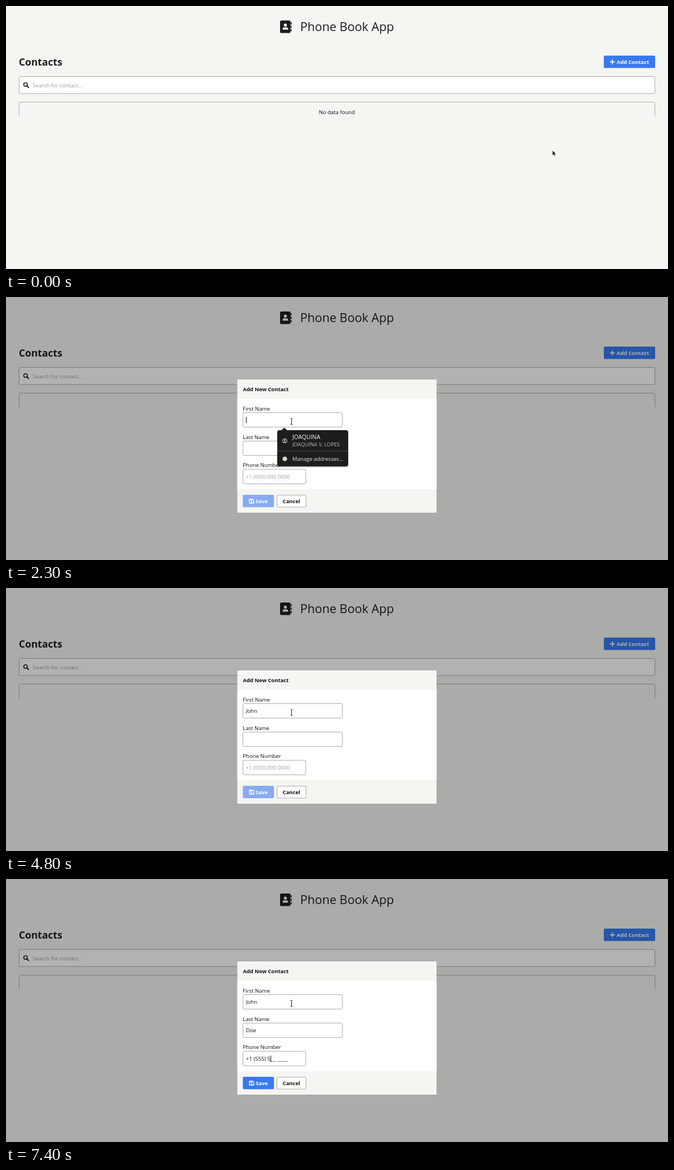
Write an HTML page that moves like this. It is 1186 px wide and 472 px high and loops after 8000 ms.

```html
<!DOCTYPE html>
<html lang="en">
<head>
<meta charset="utf-8">
<title>Phone Book App</title>
<style>
  html, body { margin: 0; width: 100%; height: 100%; overflow: hidden; background: #f5f5f2; }
  svg { display: block; width: 1186px; height: 472px; }
  text { font: 9.6px "Open Sans", "Noto Sans", sans-serif; fill: #10100f; white-space: pre; }
  .bold { font-weight: 700; font-size: 9.5px; }
  .white { fill: #fffffd; }
  .hint { fill: #9b9ca3; }
  .mid { text-anchor: middle; }
  .gap { letter-spacing: .5px; }
  .box { fill: #fffffd; stroke: #a9aab2; }
  .pop text { fill: #e4e4df; }
  .pop .main { font-size: 10.4px; fill: #f6f6f2; }
  .pop .sub { font-size: 9.3px; fill: #bdbdb8; }
</style>
</head>
<body>
<svg id="stage" viewBox="0 0 1186 472"></svg>
<script>
const LOOP = 8000;
const MASK = '+1 (___) ___ ____';
const TYPED = ['+1 (', '+1 (5', '+1 (55', '+1 (555) ', '+1 (555) 5'];
const FIELD_TOP = { first: 207, last: 258, phone: 309 };
const BLUE = '#3879ef';

const text = (x, y, str, cls = '', id = '') =>
  `<text x="${x}" y="${y}" class="${cls}" id="${id}">${str}</text>`;
const rect = (x, y, w, h, fill, r = 0, id = '') =>
  `<rect x="${x}" y="${y}" width="${w}" height="${h}" rx="${r}" fill="${fill}" id="${id}"/>`;
const box = (x, y, w, h) =>
  `<rect x="${x}" y="${y}" width="${w}" height="${h}" rx="2" class="box"/>`;

// Dark suggestion bubble hanging below a field
const bubble = (id, top, w, h, body) => `<g class="pop" id="${id}">
  ${rect(485.5, top + 1, w + 1, h + 1, 'rgba(0,0,0,.2)', 4)}
  ${rect(486, top, w, h, '#1d1d1b', 4)}
  <path d="M493 ${top + .5}l5.5-5 5.5 5z" fill="#1d1d1b"/>${body}</g>`;

const addressBubble = (id, w, fullName) => bubble(id, 239, w, 65, `
  <g fill="none" stroke="#d8d8d3"><circle cx="499.5" cy="258" r="3.9"/>
    <path d="M497 260.8q2.5-2.2 5 0"/></g>
  <circle cx="499.5" cy="257" r="1.4" fill="#d8d8d3"/>
  <path d="M486 276.5h${w}" stroke="#4b4b48"/>
  <circle cx="499.5" cy="290.5" r="4" fill="#d8d8d3"/>
  ${text(513, 255.3, 'JOAQUINA', 'main')}${text(513, 267.7, fullName, 'sub')}
  ${text(513, 294, 'Manage addresses…')}`);

const listBubble = (id, top, w, names) => bubble(id, top, w, names.length * 24 + 3,
  names.map((n, i) => text(494, top + 17 + i * 24, n)).join(''));

const page = `
  ${rect(0, 0, 1186, 472, '#f5f5f2')}
  ${rect(491, 26, 18.7, 22.5, '#1c1c1b', 2.6)}
  <path d="M510.2 29h1.6v4h-1.6zM510.2 35.2h1.6v4h-1.6zM510.2 41.4h1.6v4h-1.6z" fill="#1c1c1b"/>
  <circle cx="500.5" cy="34.3" r="2.8" fill="#f5f5f2"/>
  <path d="M495.5 42.6v-1.1q0-3.3 3.3-3.3h3.4q3.3 0 3.3 3.3v1.1z" fill="#f5f5f2"/>
  <g style="fill:#1c1c1b">
    <text x="527" y="45.3" style="font-size:21.7px;fill:#1c1c1b">Phone Book App</text>
    <text x="23" y="107" class="bold" style="font-size:17.7px;fill:#1c1c1b">Contacts</text>
  </g>
  ${rect(1071, 89, 92, 22.3, BLUE, 2, 'add')}
  <path d="M1082 100.3h8.8M1086.4 95.9v8.8" stroke="#fffffd" stroke-width="1.7"/>
  ${text(1094, 104, 'Add Contact', 'bold white')}
  ${box(23.5, 126.5, 1139, 30.5)}
  <circle cx="35" cy="141" r="3.2" fill="none" stroke="#1c1c1b" stroke-width="1.6"/>
  <path d="M37.3 143.3l3 3" stroke="#1c1c1b" stroke-width="2" stroke-linecap="round"/>
  ${text(48, 145.6, 'Search for contact...', 'hint')}
  <path d="M23.5 197.5v-23q0-2 2-2h1135q2 0 2 2v23" fill="none" stroke="#a9aab2"/>
  ${text(592.8, 193.6, 'No data found', 'mid')}`;

const modal = `<g id="modal">
  ${rect(0, 0, 1186, 472, 'rgba(0,0,0,.3)')}
  ${rect(414.5, 148, 356.8, 239, '#f5f5f2')}
  ${rect(414.5, 182.5, 356.8, 162.5, '#fffffd')}
  ${text(424.5, 169, 'Add New Contact', 'bold')}
  ${text(424.3, 203.8, 'First Name')}${box(424.5, 207.5, 178, 26)}
  ${text(424.3, 254.6, 'Last Name')}${box(424.5, 258.5, 178, 26)}
  ${text(424.3, 305.3, 'Phone Number')}${box(424.5, 309.2, 112.5, 26)}
  ${text(430, 224.2, '', '', 'first')}${text(430, 275, '', '', 'last')}
  ${text(429.7, 325.8, '+1 (000) 000 0000', 'hint', 'hint')}
  ${text(430, 325.8, '<tspan id="typed"></tspan><tspan id="rest" class="gap"></tspan>', '', 'phone')}
  ${rect(424.3, 355, 55.7, 22.3, BLUE, 2, 'save')}
  <path d="M436.2 362.6h5.8l2 2v5.4h-7.8z" fill="none" stroke="#fffffd" stroke-width="1.3" stroke-linejoin="round"/>
  <path d="M437 362.4h4.6v2.6h-4.6z" fill="#fffffd"/>
  <circle cx="440.1" cy="367.4" r="1.3" fill="#fffffd"/>
  ${text(447.2, 370, 'Save', 'bold white')}
  ${box(485.5, 355.5, 52, 21.5)}${text(511.3, 370, 'Cancel', 'bold mid')}
  ${rect(430, 215, 1, 11.5, '#10100f', 0, 'caret')}
  ${addressBubble('short', 127, 'JOAQUINA V. LOPES')}
  ${addressBubble('full', 151, 'JOAQUINA VIDEIRA LOPES')}
  ${listBubble('john', 239, 95, ['John'])}
  ${listBubble('two', 290, 97, ['Doe', 'Dane'])}
  ${listBubble('one', 290, 97, ['Doe'])}
</g>`;

const pointers = `
  <path id="arrow" d="M0 0v9.6l2.2-2 1.6 3.6 1.6-.7-1.6-3.5h3z" fill="#151514" stroke="#f5f5f2" stroke-width=".8"/>
  <path id="hand" d="M-.9 6.2V.6Q0-.7.9.6v3.2l3.5.8q1.3.4 1.2 1.8l-.6 2.8-.7 1.6H-.2l-2.7-3.9q-.2-1.5 1-1.1z" fill="#fffffd" stroke="#222" stroke-width=".9"/>
  <path id="beam" d="M-2-5.5h1.4l.6.6.6-.6H2M0-5V5M-2 5.5h1.4l.6-.6.6.6H2" fill="none" stroke="#1c1c1b" stroke-width="1"/>`;

document.getElementById('stage').innerHTML = page + modal + pointers;
const el = id => document.getElementById(id);
const show = (id, on) => el(id).style.display = on ? '' : 'none';

// Each step changes only the values it lists
const START = { shape: 'arrow', x: 979, y: 259, hover: false, modal: false, focus: 'first',
  caret: true, first: '', last: '', digits: -1, pop: '', save: false };
const STEPS = [
  [100, { x: 1003, y: 248 }],
  [300, { x: 1022, y: 222 }],
  [400, { x: 1062, y: 162 }],
  [500, { x: 1100, y: 114 }],
  [600, { x: 1115.5, y: 96.5, shape: 'hand', hover: true }],
  [1100, { x: 1114.5, y: 98.5, shape: 'arrow', modal: true }],
  [1200, { x: 985, y: 130, hover: false }],
  [1300, { x: 780, y: 171 }],
  [1600, { x: 735, y: 182, caret: false }],
  [1700, { x: 630, y: 206 }],
  [1800, { x: 540, y: 221, shape: 'beam' }],
  [1900, { x: 511.5, y: 223.5, caret: true }],
  [2300, { pop: 'short' }],
  [2500, { caret: false }],
  [2900, { first: 'J', pop: 'full', caret: true }],
  [3500, { caret: false }],
  [3600, { first: 'Jo', pop: '', caret: true }],
  [3700, { pop: 'john' }],
  [3800, { first: 'Joh' }],
  [4000, { first: 'John' }],
  [4200, { focus: 'last', pop: '' }],
  [4800, { caret: false }],
  [5000, { last: 'D', pop: 'two', caret: true }],
  [5200, { last: 'Do' }],
  [5300, { pop: 'one' }],
  [5400, { last: 'Doe', pop: '' }],
  [5900, { focus: 'phone', digits: 0 }],
  [6000, { save: true }],
  [6500, { caret: false }],
  [7000, { digits: 1, caret: true }],
  [7100, { digits: 2 }],
  [7200, { digits: 3 }],
  [7400, { digits: 4 }]
];

function render(s) {
  el('add').setAttribute('fill', s.hover ? '#5593f1' : BLUE);
  el('save').setAttribute('fill', s.save ? BLUE : '#87aaf2');
  show('modal', s.modal);
  el('first').textContent = s.first;
  el('last').textContent = s.last;

  const prefix = TYPED[s.digits] || '';
  el('typed').textContent = prefix;
  el('rest').textContent = prefix && MASK.slice(prefix.length);
  show('hint', !prefix);

  for (const id of ['short', 'full', 'john', 'two', 'one']) show(id, s.pop === id);
  for (const id of ['arrow', 'hand', 'beam']) show(id, s.shape === id);
  el(s.shape).setAttribute('transform', `translate(${s.x} ${s.y})`);

  show('caret', s.caret);
  if (s.modal) {
    const entry = el(s.focus === 'phone' ? 'typed' : s.focus);
    const width = entry.textContent ? entry.getComputedTextLength() : 0;
    el('caret').setAttribute('x', Math.round(430 + width));
    el('caret').setAttribute('y', FIELD_TOP[s.focus] + 8);
  }
}

let last = -1;
function frame() {
  const t = performance.now() % LOOP;
  const count = STEPS.filter(([at]) => at <= t).length;
  if (count !== last) {
    last = count;
    render(Object.assign({}, START, ...STEPS.slice(0, count).map(([, change]) => change)));
  }
  requestAnimationFrame(frame);
}
frame();
</script>
</body>
</html>
```
